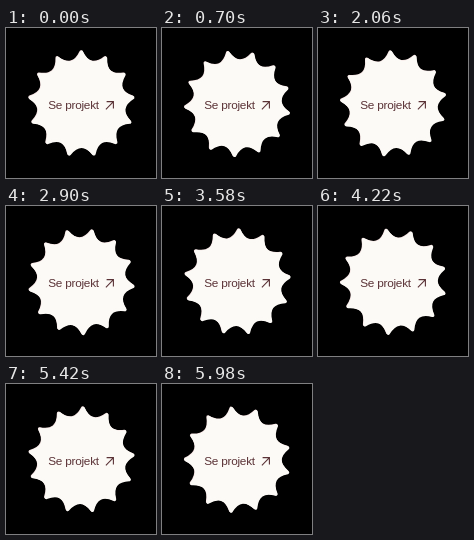
Recreate the animation shown at these times as an HTML page. Size 150 by 150 pixels, loop 6 s.

```html
<!DOCTYPE html>
<html lang="da">
<head>
<meta charset="utf-8">
<title>Se projekt</title>
<style>
  html, body { margin: 0; width: 100%; height: 100%; overflow: hidden; background: #000; }
  svg { display: block; width: 100vw; height: 100vh; }
  text { font: 11.8px "Liberation Sans", Arial, sans-serif; letter-spacing: -0.25px; fill: #5a3236; }
</style>
</head>
<body>
<svg viewBox="0 0 150 150">
  <g stroke-linejoin="round" stroke-width="3.4">
    <!-- pale pink rim, showing only at the upper left -->
    <g transform="translate(75.1 75.4)"><path class="star" fill="#f5e1e1" stroke="#f5e1e1"/></g>
    <g transform="translate(75.6 75.9)"><path class="star" fill="#fcfaf6" stroke="#fcfaf6"/></g>
  </g>
  <text x="42.2" y="80.9">Se projekt</text>
  <path d="M99.9 81.3 L107.2 73.9 M100.6 73.6 H107.4 V80.4" fill="none" stroke="#5a3236" stroke-width="1.1"/>
</svg>
<script>
const LOOP = 6000, TURN = 24000; // ms
const SPIKES = 13, TIP = 51.5, DIP = 35;
const stars = document.querySelectorAll('.star');

// Point at radius r, i spikes clockwise from the top
function point(r, i) {
  const a = i * 2 * Math.PI / SPIKES;
  return `${(r * Math.sin(a)).toFixed(2)} ${(-r * Math.cos(a)).toFixed(2)}`;
}

let outline = 'M' + point(TIP, 0);
for (let i = 0; i < SPIKES; i++) outline += `Q${point(DIP, i + 0.5)} ${point(TIP, i + 1)}`;
for (const star of stars) star.setAttribute('d', outline + 'Z');

function draw() {
  const angle = -360 * (performance.now() % LOOP) / TURN;
  for (const star of stars) star.setAttribute('transform', `rotate(${angle})`);
  requestAnimationFrame(draw);
}
draw();
</script>
</body>
</html>
```
